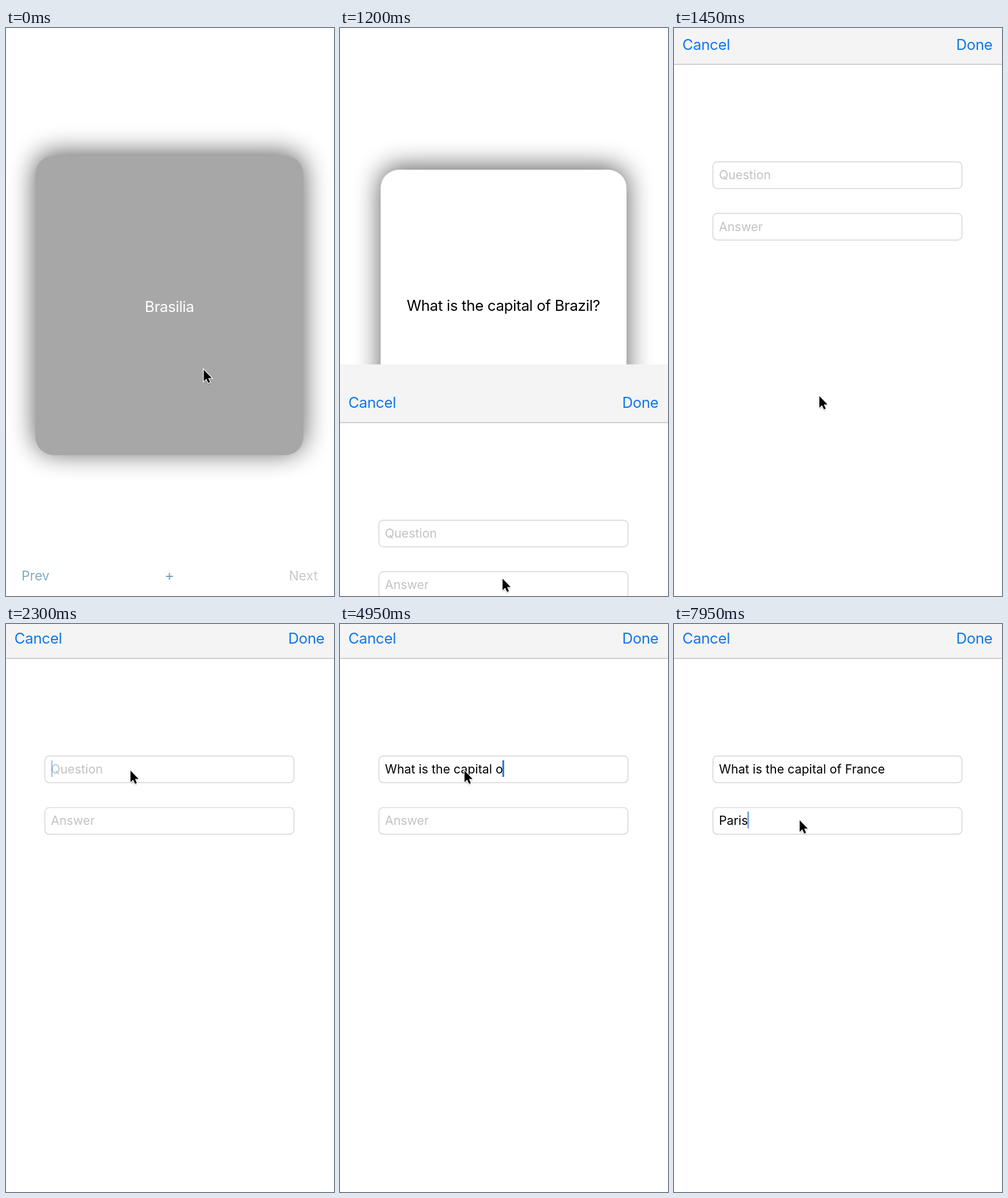
An HTML page that plays this animation: 569 by 984 pixels, repeating every 8000 ms.

```html
<!DOCTYPE html>
<html lang="en">
<head>
<meta charset="utf-8">
<title>Flashcards</title>
<style>
  html, body { margin: 0; width: 100%; height: 100%; overflow: hidden; background: #fff; }
  svg { display: block; width: 100%; height: 100%; font-family: Inter, Roboto, "Liberation Sans", sans-serif; }
  text { white-space: pre; }
  .title { font-size: 25.8px; letter-spacing: -.33px; }
  .tool { font-size: 22.8px; fill: #85aac1; }
  .entry { font-size: 21.2px; letter-spacing: .07px; }
  .link { fill: #0f78ea; }
  .hint { fill: #c2c2c4; }
  .box { fill: #fff; stroke: #cdcdcd; stroke-width: 1.2; }
  .mid { text-anchor: middle; }
  .end { text-anchor: end; }
</style>
</head>
<body>
<svg viewBox="0 0 569 984">
  <defs>
    <filter id="soft" x="-30%" y="-30%" width="160%" height="160%" color-interpolation-filters="sRGB">
      <feGaussianBlur stdDeviation="22.8"/>
    </filter>
    <filter id="drop" x="-50%" y="-50%" width="200%" height="200%">
      <feGaussianBlur stdDeviation="1.5"/>
    </filter>
  </defs>

  <g id="deck">
    <rect id="shade" rx="32" opacity=".65" filter="url(#soft)"/>
    <rect id="card" rx="32"/>
    <text id="face" class="title mid" x="283.5"/>
    <text class="tool" x="27" y="957">Prev</text>
    <path d="M277.5 950h12M283.5 944v12" stroke="#6f9fbf" stroke-width="2"/>
    <text class="tool end" x="541" y="957" style="fill:#c8c8c8">Next</text>
  </g>

  <g id="sheet">
    <rect y="-41" width="569" height="1030" fill="#fff"/>
    <rect y="-41" width="569" height="100.5" fill="#f4f4f4"/>
    <path d="M0 59.7H569" stroke="#b4b4b4" stroke-width="1.2"/>
    <text class="title link" x="14.5" y="34.4">Cancel</text>
    <text class="title link end" x="552.5" y="34.4">Done</text>
    <rect class="box" x="67.5" y="228.7" width="432" height="46.2" rx="7.5"/>
    <rect class="box" x="67.5" y="318" width="432" height="46.2" rx="7.5"/>
    <text id="question" class="entry" x="78" y="259"/>
    <text id="answer" class="entry" x="78" y="348.4"/>
    <rect id="caret" width="3" height="29" rx=".8" fill="#1c72de"/>
  </g>

  <g id="cursor">
    <path d="M1 4V24L5.5 19.8 9 27 12 25.6 8.8 18.5H15Z" opacity=".45" filter="url(#drop)"/>
    <path d="M1 2V22L5.5 17.8 9 25 12 23.6 8.8 16.5H15Z" stroke="#fff" stroke-width="2.4" paint-order="stroke"/>
  </g>
</svg>
<script>
const LOOP = 8000;
const FLIP = 350;
const OPEN = 1150;
const el = id => document.getElementById(id);
const set = (node, attrs) => {
  for (const k in attrs) node.setAttribute(k, attrs[k]);
};
const clamp = v => Math.min(1, Math.max(0, v));
const smooth = v => v * v * (3 - 2 * v);

// time, x, y
const path = [
  [400, 342, 590], [1100, 281, 952], [1320, 281, 952], [1600, 215, 252],
  [6350, 215, 252], [6550, 227.5, 322], [6650, 217, 338]
];

const burst = Array.from({ length: 14 }, (_, i) => 3700 + 50 * i);
const fields = [
  {
    node: el('question'), hint: 'Question', text: 'What is the capital of France',
    keys: [...burst, 4500, 4525, 4550, 4700, 4750, 4850, 4950, 5050, 5100,
      5400, 5500, 5650, 5750, 5900, 6000],
    focus: 1850, blink: 1760, blur: 6650, caretY: 236
  },
  {
    node: el('answer'), hint: 'Answer', text: 'Paris',
    keys: [7050, 7200, 7350, 7600, 7650],
    focus: 6750, blink: 6750, blur: LOOP, caretY: 325
  }
];

const faces = [
  { text: 'Brasilia', x: 51, y: 221.5, w: 465, h: 518.5, fill: '#a7a7a7', ink: '#fff', base: 491.5 },
  { text: 'What is the capital of Brazil?', x: 70.5, y: 245.5, w: 426.5, h: 470.5, fill: '#fff', ink: '#000', base: 490 }
];

function drawCard(t) {
  const f = faces[t < FLIP ? 0 : 1];
  const box = { x: f.x, width: f.w, height: f.h };
  set(el('card'), { ...box, y: f.y, fill: f.fill });
  set(el('shade'), { ...box, y: f.y - 4.5 });
  const face = el('face');
  face.textContent = f.text;
  set(face, { y: f.base, fill: f.ink });
}

// Critically damped slide from below the stage.
function drawSheet(t) {
  const p = Math.max(0, t - OPEN) * 0.0265;
  const y = 1025 * (1 + p) * Math.exp(-p);
  set(el('sheet'), { transform: `translate(0 ${y.toFixed(2)})` });
}

function blinkLevel(age) {
  const phase = age % 490;
  if (age < 245) return 1;
  return phase >= 245 ? 1 - clamp((phase - 245) / 150) : clamp(phase / 150);
}

function drawFields(t) {
  const caret = el('caret');
  set(caret, { opacity: 0 });
  for (const f of fields) {
    const count = f.keys.filter(k => k <= t).length;
    f.node.textContent = count ? f.text.slice(0, count) : f.hint;
    f.node.classList.toggle('hint', !count);
    if (t < f.focus || t >= f.blur) continue;
    const last = count ? f.keys[count - 1] : f.blink;
    const x = count ? 76.9 + f.node.getComputedTextLength() : 78;
    set(caret, { x, y: f.caretY, opacity: blinkLevel(t - last) });
  }
}

function drawCursor(t) {
  let [, x, y] = path[0];
  for (let i = 1; i < path.length; i++) {
    const [t0, x0, y0] = path[i - 1];
    const [t1, x1, y1] = path[i];
    if (t < t0) break;
    const p = smooth(clamp((t - t0) / (t1 - t0)));
    x = x0 + (x1 - x0) * p;
    y = y0 + (y1 - y0) * p;
  }
  set(el('cursor'), { transform: `translate(${x} ${y})` });
}

const start = performance.now();
function frame() {
  const t = (performance.now() - start) % LOOP;
  drawCard(t);
  drawSheet(t);
  drawFields(t);
  drawCursor(t);
  requestAnimationFrame(frame);
}
frame();
</script>
</body>
</html>
```
